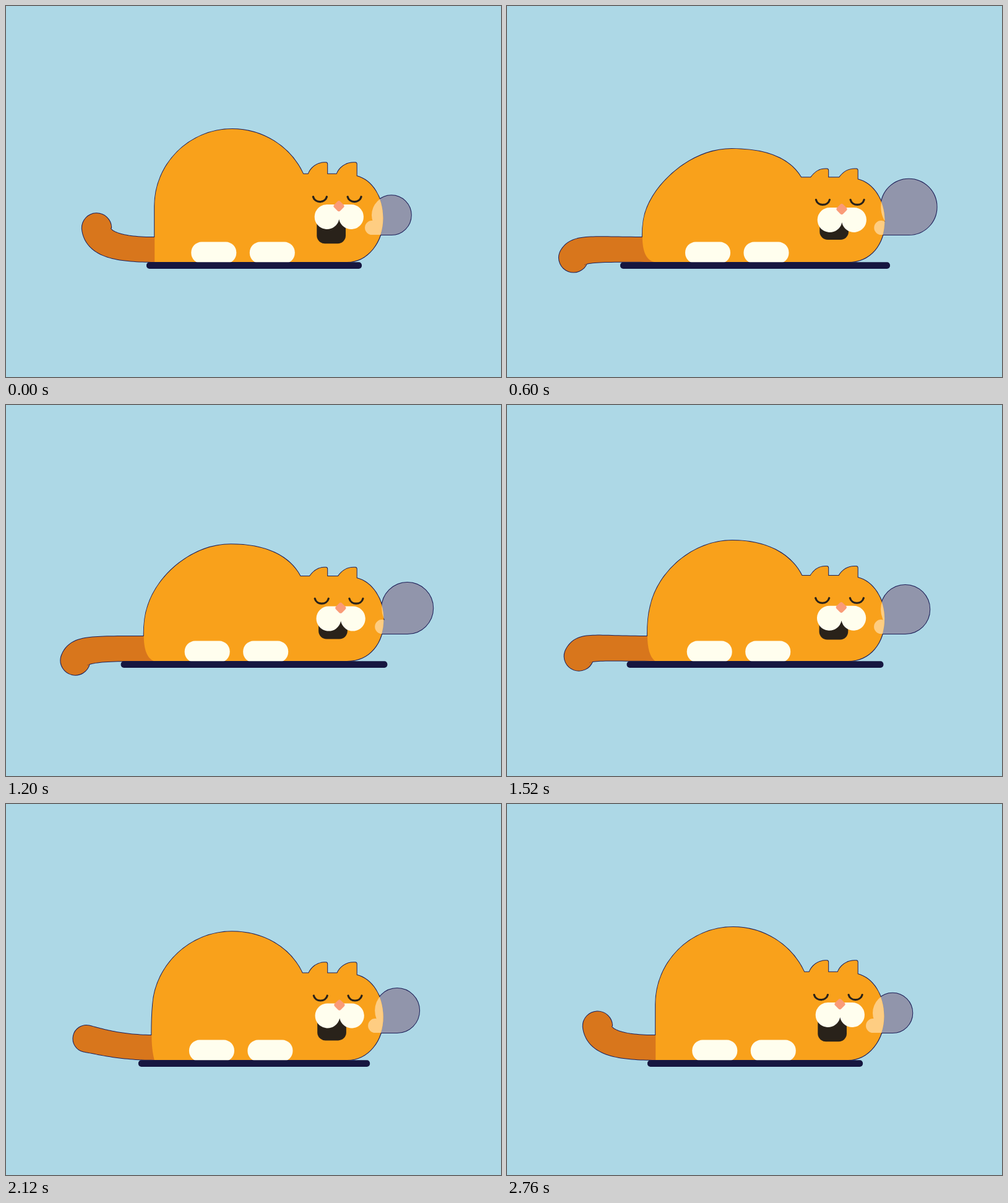
These frames come from a looping animation (800 by 600 pixels, 2.8 s). An HTML page:

```html
<!DOCTYPE html>
<html lang="en">
<head>
<meta charset="utf-8">
<title>Sleeping cat</title>
<style>
html, body { margin: 0; width: 100%; height: 100%; overflow: hidden; background: #add8e6; }
svg { display: block; width: 100%; height: 100%; }
</style>
</head>
<body>
<svg viewBox="0 0 800 600">
  <defs>
    <path id="body"/>
    <path id="tail"/>
    <path id="bubble"/>
    <clipPath id="inBody"><use href="#body"/></clipPath>
  </defs>
  <g fill="none" stroke="#1d1f58" stroke-width="2" stroke-linejoin="round">
    <use href="#tail"/><use href="#bubble"/><use href="#body"/>
  </g>
  <use href="#tail" fill="#d8761c"/>
  <use href="#bubble" fill="#9195ab"/>
  <use href="#body" fill="#f9a11b"/>
  <g id="paws" fill="#fffeee">
    <rect x="299.3" y="381.6" width="73" height="35" rx="17"/>
    <rect x="393.8" y="381.6" width="73" height="35" rx="17"/>
  </g>
  <rect id="floor" y="414.3" height="10.7" rx="4.8" fill="#161640"/>
  <g id="face">
    <rect id="mouth" x="502.3" y="340" width="46.7" rx="13" fill="#29221a"/>
    <path d="M518.5 321H558A20 20 0 1 1 538.3 345A20 20 0 1 1 518.5 321Z" fill="#fffeee"/>
    <rect x="531" y="316.6" width="14" height="14" rx="3.5" transform="rotate(45 538 323.6)" fill="#fa9b78"/>
    <path d="M496.4 308.5C499 319.2 515.8 319.2 518.4 308.5M552.1 308.5C554.7 319.2 571.5 319.2 574.1 308.5" fill="none" stroke="#29221a" stroke-width="3.2" stroke-linecap="round"/>
  </g>
  <use href="#bubble" fill="#fecd82" clip-path="url(#inBody)"/>
</svg>
<script>
const LOOP = 2800, STEP = 40, PEAK = 600, REST = 920;
const el = id => document.getElementById(id);
const set = (id, attrs) => { for (const k in attrs) el(id).setAttribute(k, attrs[k]); };
const mix = (a, b, p) => a + (b - a) * p;
const clamp = v => Math.min(1, Math.max(0, v));
const smooth = v => { v = clamp(v); return v * v * (3 - 2 * v); };
const line = v => v;
const easeOut = v => 1 - Math.pow(1 - v, 1.4);

// breathe out until `up`, hold, breathe in again from `down`
const swing = (t, up, down, rise, fall) =>
  t < up ? rise(t / up) : 1 - fall(clamp((t - down) / (LOOP - down)));

// b flattens the back, h lowers the head
function bodyPath(b, h) {
  const m = (x, y) => mix(x, y, b), n = (x, y) => mix(x, y, h);
  const y = n(271.8, 277.2), tip = n(253.3, 263.4), low = 414, top = m(199, 231);
  const ear = (x, end) => {
    const s = x + n(0.5, 3);
    return `L${s} ${y}C${s + n(4, 5)} ${tip + n(8, 7)} ${x + 15} ${tip} ${end - 5} ${tip}` +
      `L${end - 2} ${tip}Q${end} ${tip} ${end} ${tip + 2.5}`;
  };
  return `M${m(240.2, 238.5)} ${low}` +
    `C${m(240.2, 224.7)} ${m(400, 411.5)} ${m(240.2, 218.8)} ${m(386, 396)} ${m(240.2, 218.8)} 373` +
    `C${m(240.2, 218.8)} ${m(356, 352)} ${m(240.2, 220.8)} 339 ${m(240.2, 226.8)} ${m(324, 325)}` +
    `C${m(240.2, 246.5)} ${m(255, 278)} ${m(296.4, 303)} ${top} ${m(365.5, 363)} ${top}` +
    `C${m(414.5, 420)} ${top} ${m(459.8, 457.5)} ${m(227, 247)} ${n(480.4, 475.4)} ${y}` +
    ear(488, 519.2) + `L519.2 ${y}` + ear(534, 566.7) + `L566.7 ${n(275, 280.2)}` +
    `C${n(591.5, 592.5)} ${n(281.5, 286.5)} ${n(609.4, 610.4)} ${n(309, 315)} ${n(609.4, 610.4)} ${n(343, 346)}` +
    `C${n(609.4, 610.4)} ${n(382, 386)} ${n(584.5, 587.5)} ${low} 551 ${low}Z`;
}

// time, tip x, tip y, droop angle, base handle, tip handle
const CURL = [146.5, 359, -88, 52, 28];
const POSES = [
  [0, ...CURL],
  [280, 118, 392, 50, 90, 18],
  [600, 107.5, 407, 69, 95, 18],
  [1200, 112, 413, 77, 95, 20],
  [1800, 121, 396.5, 53, 95, 18],
  [2120, 130, 379.5, -12, 55, 20],
  [LOOP, ...CURL]
];

function slope(i, k) {
  const a = POSES[i - 1], b = POSES[i + 1];
  return a && b ? (b[k] - a[k]) / (b[0] - a[0]) : 0;
}

function tailPose(t) {
  let i = 0;
  while (t >= POSES[i + 1][0]) i++;
  const p = POSES[i], q = POSES[i + 1], d = q[0] - p[0], u = (t - p[0]) / d;
  return [1, 2, 3, 4, 5].map(k =>
    mix(p[k], q[k], smooth(u)) +
    d * u * (1 - u) * ((1 - u) * slope(i, k) - u * slope(i + 1, k)));
}

function tailPath(t) {
  const [x, y, droop, a, k] = tailPose(t), N = 32;
  const ang = droop * Math.PI / 180, dx = -Math.cos(ang), dy = Math.sin(ang);
  const X = [240, 240 - a, x - dx * k, x], Y = [394, 394, y - dy * k, y];
  const cap = 21 + 2.7 * Math.abs(dy);  // a bent tip looks fuller
  const at = (P, u) => {
    const v = 1 - u;
    return v * v * v * P[0] + 3 * v * v * u * P[1] + 3 * v * u * u * P[2] + u * u * u * P[3];
  };
  const der = (P, u) => {
    const v = 1 - u;
    return v * v * (P[1] - P[0]) + 2 * v * u * (P[2] - P[1]) + u * u * (P[3] - P[2]);
  };
  const top = ["252 374"], bottom = ["252 414"];
  for (let i = 0; i <= N; i++) {
    const u = i / N, cx = at(X, u), cy = at(Y, u), gx = der(X, u), gy = der(Y, u);
    const r = mix(19.9, cap, u * u) / Math.hypot(gx, gy);
    top.push(`${cx - gy * r} ${cy + gx * r}`);
    bottom.push(`${cx + gy * r} ${cy - gx * r}`);
  }
  bottom.reverse();
  return `M${top.join("L")}A${cap} ${cap} 0 0 0 ${bottom.join("L")}Z`;
}

function bubblePath(shift, grow) {
  const r = 31.9 + grow / 2, s = 591.5 + shift, cx = 591 + shift + r, low = 370.1;
  const disc = (x, R) =>
    `M${x} ${low}A${R} ${R} 0 1 1 ${x} ${low - 2 * R}A${R} ${R} 0 1 1 ${x} ${low}Z`;
  return disc(s, 11.5) + disc(cx, r) + `M${s} ${low - 15}H${cx}V${low}H${s}Z`;
}

function draw(t) {
  const b = swing(t, PEAK, PEAK, smooth, smooth);
  const h = swing(t, PEAK, REST, smooth, smooth);
  const grow = 26.5 * swing(t, PEAK, PEAK, line, line);
  const shift = 17.2 * swing(t, REST, REST, easeOut, smooth);
  set("body", { d: bodyPath(b, h) });
  set("tail", { d: tailPath(t) });
  set("bubble", { d: bubblePath(shift, grow) });
  set("floor", { x: 227 - 44 * h, width: 348 + 88 * h });
  set("paws", { transform: `translate(${-11.3 * h} 0)` });
  set("face", { transform: `translate(${3 * h} ${4.9 * h})` });
  set("mouth", { height: 44.2 - 11 * h });
}

const start = performance.now();
function tick(now) {
  const t = Math.max(0, now - start) % LOOP;
  draw(Math.floor(t / STEP) * STEP);
  requestAnimationFrame(tick);
}
draw(0);
requestAnimationFrame(tick);
</script>
</body>
</html>
```
